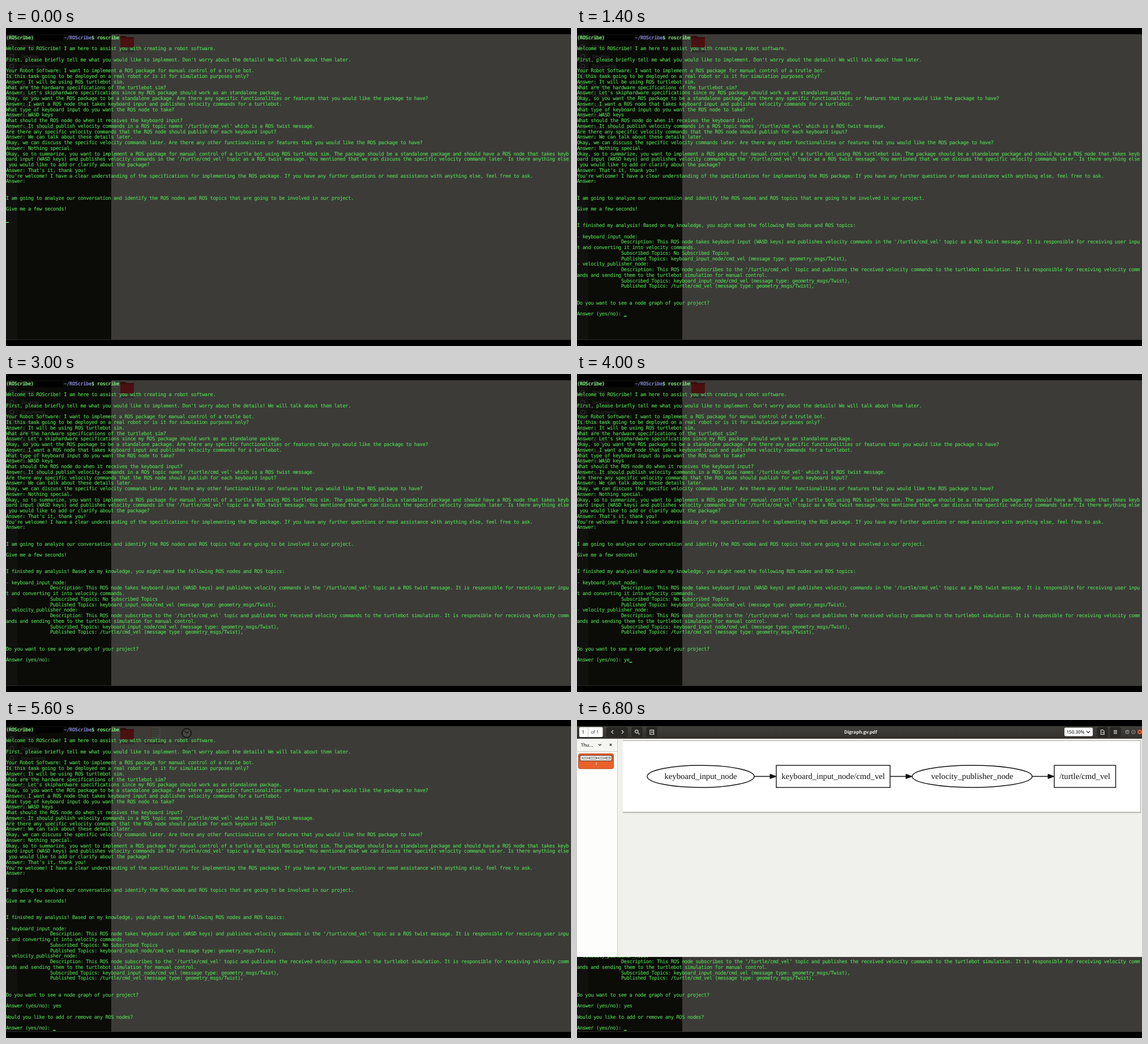
An HTML page that plays this animation: 998x561 px, repeating every 8 s.

```html
<!DOCTYPE html>
<html lang="en">
<head>
<meta charset="utf-8">
<title>ROScribe session</title>
<style>
html, body { margin: 0; width: 100%; height: 100%; overflow: hidden; background: #000; text-rendering: geometricPrecision; }
svg { position: absolute; left: 0; top: 0; font-family: "Open Sans", "Noto Sans", sans-serif; }
/* laid out at ten times the size so the character pitch stays exact */
pre {
  position: absolute; left: 0; top: 12.2px; margin: 0;
  font: 88px/97.43px "DejaVu Sans Mono", monospace; letter-spacing: -4.26px;
  color: #54de54; -webkit-text-stroke: 1px #54de54;
  transform: scale(.1); transform-origin: 0 0;
}
pre b { color: #7be87a; -webkit-text-stroke: 0; }
pre b i { color: #8080d4; font-style: normal; }
#cursor { display: inline-block; width: 48px; height: 16px; vertical-align: -22px; background: #54de54; }
.mono { fill: none; stroke: #dcdcd6; stroke-width: 1.2; }
</style>
</head>
<body>
<svg width="998" height="561">
  <rect y="11" width="998" height="539" fill="#3c3b38"/>
  <rect y="11" width="186" height="539" fill="#0b0b08"/>
  <rect y="11" width="20" height="539" fill="#11110f"/>
  <path d="M0 549.8H998" stroke="#484742" stroke-width=".6"/>
  <g id="places" font-size="8" fill="#3a3937"></g>
  <g id="folder">
    <path d="M202 14h9l2 2h13v18h-24z" fill="#380d0c"/>
    <path d="M202 18h24v16h-24z" fill="#4a1110"/>
    <path d="M203 41h24" stroke="#2b2a28" stroke-width="3" stroke-dasharray="5 1"/>
  </g>
  <g id="files" fill="#292826">
    <rect x="254" y="12" width="20" height="23" fill="#42403c"/>
    <path d="M258 16h12M258 20h12M258 24h12M258 28h9" stroke="#2c2a28"/>
    <path d="M256 13v21" stroke="#4a2925" stroke-width="2"/>
    <path d="M246 41h36" stroke="#2c2b28" stroke-width="3" stroke-dasharray="6 1"/>
    <circle cx="319" cy="23" r="8" fill="#474541" stroke="#151513" stroke-width="1.8"/>
    <path d="M315 19l4 4 4-2" fill="none" stroke="#151513" stroke-width="1.4"/>
    <text x="319" y="43" font-size="8" text-anchor="middle">Digraph.gv.</text>
    <text x="315" y="51" font-size="8" text-anchor="middle">pdf</text>
  </g>
  <rect x="49" y="13" width="52" height="10"/>
</svg>

<pre><b>(ROScribe)           <i>~/ROScribe</i>$ roscribe</b>
<span id="log"></span><span id="cursor"></span></pre>

<svg id="viewer" width="998" height="561">
  <defs>
    <linearGradient id="bar" x2="0" y2="1"><stop stop-color="#42403b"/><stop offset="1" stop-color="#33312d"/></linearGradient>
  </defs>
  <rect y="11" width="998" height="407" fill="#f0f0ec"/>
  <path d="M81 36h915v127.5H81z" fill="#aaa9a4"/>
  <path d="M81 37h914v125H81z" fill="#fff"/>
  <path d="M82 164.2h914" stroke="#d6d6d1"/>
  <g fill="none" stroke="#111" stroke-width="1.4">
    <ellipse cx="218.5" cy="99.5" rx="94.5" ry="19.5"/>
    <rect x="352" y="80" width="201" height="39"/>
    <ellipse cx="698" cy="99.5" rx="106" ry="19.5"/>
    <rect x="843" y="80" width="108.5" height="39"/>
    <path d="M313 99.5h29M553 99.5h29M804 99.5h29"/>
    <path d="M341 95.5l11 4-11 4zM581 95.5l11 4-11 4zM832 95.5l11 4-11 4z" fill="#111" stroke-width="1"/>
  </g>
  <g font-family="'Liberation Serif', serif" font-size="14.7" fill="#111" text-anchor="middle">
    <text x="218.5" y="104">keyboard_input_node</text>
    <text x="452.5" y="104">keyboard_input_node/cmd_vel</text>
    <text x="698" y="104">velocity_publisher_node</text>
    <text x="897" y="104">/turtle/cmd_vel</text>
  </g>

  <rect y="32" width="71" height="386" fill="#fdfdfc"/>
  <rect y="32" width="71" height="23" fill="#f5f5f2"/>
  <path d="M71.5 32v386M0 55.5h71" stroke="#cfcec8"/>
  <text x="7" y="47" font-size="8" font-weight="600" fill="#333">Thu…</text>
  <path d="M38 42.5l2.5 2.5 2.5-2.5M57.7 42l3.6 3.6m0-3.6l-3.6 3.6" fill="none" stroke="#333" stroke-width="1.2"/>
  <rect x="2.5" y="59.5" width="62" height="26.5" rx="3" fill="#e9622c" stroke="#b9481b"/>
  <rect x="5.5" y="62.5" width="56" height="9.5" fill="#fff" stroke="#4a2a1c"/>
  <g fill="none" stroke="#222" stroke-width=".8">
    <ellipse cx="14" cy="67.2" rx="5.7" ry="1.6"/><rect x="22" y="65.6" width="12.2" height="3.2"/>
    <ellipse cx="43" cy="67.2" rx="6.4" ry="1.6"/><rect x="51.5" y="65.6" width="7" height="3.2"/>
    <path d="M19.7 67.2h2.3M34.2 67.2h2.4M49.4 67.2h2.1"/>
  </g>
  <text x="34" y="80" font-size="7" font-style="italic" fill="#fff" text-anchor="middle">1</text>

  <rect y="11" width="998" height="21.5" fill="url(#bar)"/>
  <path d="M0 32.3h998" stroke="#1d1c19"/>
  <rect x="4" y="12.5" width="41.5" height="17.5" rx="2" fill="#fff"/>
  <path d="M19.5 12.5v17.5" stroke="#c5c5c0"/>
  <g font-size="8" font-weight="600" fill="#333">
    <text x="8.5" y="24">1</text>
    <text x="24.5" y="24" font-weight="400">of 1</text>
  </g>
  <g fill="#292824" stroke="#22211e">
    <rect x="53" y="13" width="36" height="16.5" rx="2"/>
    <rect x="97" y="13" width="18" height="16.5" rx="2"/>
    <rect x="123" y="13" width="18" height="16.5" rx="2"/>
    <rect x="919" y="13" width="18" height="16.5" rx="2"/>
    <rect x="942" y="13" width="18" height="16.5" rx="2"/>
  </g>
  <g class="mono">
    <path d="M64 18l-3 3 3 3M79 18l3 3-3 3M107.5 22.5l3 3"/>
    <circle cx="105.3" cy="20.3" r="2.7"/>
    <path d="M129 17.5h6.5v8H129zM130.5 20h4M130.5 22.5h4"/>
    <path d="M925.5 17.5h3.5l2 2v6h-5.5zM927.5 22.5h4M948 18.7h6M948 21.2h6M948 23.7h6"/>
  </g>
  <text x="501" y="24" font-size="8" font-weight="700" fill="#eeede8" text-anchor="middle">Digraph.gv.pdf</text>
  <rect x="861" y="13.5" width="50" height="15" rx="2" fill="#fff"/>
  <text x="864.5" y="24" font-size="8" font-weight="600" fill="#333">150.30%</text>
  <path d="M900 19.5l3 3 3-3" fill="none" stroke="#333" stroke-width="1.3"/>
  <g fill="#74726b" stroke="#22211e" stroke-width=".8">
    <circle cx="972" cy="21" r="4.6"/><circle cx="983" cy="21" r="4.6"/>
    <circle cx="994" cy="21" r="4.6" fill="#ea5b2b"/>
  </g>
  <path d="M970 22h4M981.3 19.3h3.4v3.4h-3.4zM992.3 19.3l3.4 3.4m0-3.4l-3.4 3.4" fill="none" stroke="#2b2a26"/>
</svg>

<script>
const intro = `
Welcome to ROScribe! I am here to assist you with creating a robot software.

First, please briefly tell me what you would like to implement. Don't worry about the details! We will talk about them later.

Your Robot Software: I want to implement a ROS package for manual control of a trutle bot.
Is this task going to be deployed on a real robot or is it for simulation purposes only?
Answer: It will be using ROS turtlebot sim.
What are the hardware specifications of the turtlebot sim?
Answer: Let's skiphardware specifications since my ROS package should work as an standalone package.
Okay, so you want the ROS package to be a standalone package. Are there any specific functionalities or features that you would like the package to have?
Answer: I want a ROS node that takes keyboard input and publishes velocity commands for a turtlebot.
What type of keyboard input do you want the ROS node to take?
Answer: WASD keys
What should the ROS node do when it receives the keyboard input?
Answer: It should publish velocity commands in a ROS topic names '/turtle/cmd_vel' which is a ROS twist message.
Are there any specific velocity commands that the ROS node should publish for each keyboard input?
Answer: We can talk about these details later.
Okay, we can discuss the specific velocity commands later. Are there any other functionalities or features that you would like the ROS package to have?
Answer: Nothing special.
Okay, so to summarize, you want to implement a ROS package for manual control of a turtle bot using ROS turtlebot sim. The package should be a standalone package and should have a ROS node that takes keyb
oard input (WASD keys) and publishes velocity commands in the '/turtle/cmd_vel' topic as a ROS twist message. You mentioned that we can discuss the specific velocity commands later. Is there anything else
 you would like to add or clarify about the package?
Answer: That's it, thank you!
You're welcome! I have a clear understanding of the specifications for implementing the ROS package. If you have any further questions or need assistance with anything else, feel free to ask.
Answer:


I am going to analyze our conversation and identify the ROS nodes and ROS topics that are going to be involved in our project.

Give me a few seconds!

`;
const tab = ' '.repeat(16);
const analysis = `
I finished my analysis! Based on my knowledge, you might need the following ROS nodes and ROS topics:

- keyboard_input_node:
${tab}Description: This ROS node takes keyboard input (WASD keys) and publishes velocity commands in the '/turtle/cmd_vel' topic as a ROS twist message. It is responsible for receiving user inpu
t and converting it into velocity commands.
${tab}Subscribed Topics: No Subscribed Topics
${tab}Published Topics: keyboard_input_node/cmd_vel (message type: geometry_msgs/Twist),
- velocity_publisher_node:
${tab}Description: This ROS node subscribes to the '/turtle/cmd_vel' topic and publishes the received velocity commands to the turtlebot simulation. It is responsible for receiving velocity comm
ands and sending them to the turtlebot simulation for manual control.
${tab}Subscribed Topics: keyboard_input_node/cmd_vel (message type: geometry_msgs/Twist),
${tab}Published Topics: /turtle/cmd_vel (message type: geometry_msgs/Twist),


Do you want to see a node graph of your project?

Answer (yes/no): `;
const question = `
Would you like to add or remove any ROS nodes?

Answer (yes/no): `;

// each entry is printed at its time in ms
const output = [[0, intro], [1400, analysis], [4000, 'ye'], [4600, 's'], [4800, '\n'], [5200, question]];
const byId = id => document.getElementById(id);
const show = (id, on) => byId(id).style.visibility = on ? 'visible' : 'hidden';

const places = ['Recent', 'Home', 'Desktop', 'Documents', 'Downloads', 'Music', 'Pictures', 'Videos', 'Trash', 'Other Locations'];
byId('places').innerHTML = places.map((name, i) => {
  const y = 15 + i * 17.4 + (i == 9 ? 4 : 0);
  return `<text x="27" y="${y + 3}">${name}</text>
    <rect x="7" y="${y - 3}" width="6.5" height="6.5" rx="1.5" fill="none" stroke="#3a3937"/>`;
}).join('');

let last;
function draw(now) {
  const t = now % 8000;
  const text = output.filter(([at]) => t >= at).map(([, s]) => s).join('');
  if (text !== last) byId('log').textContent = last = text;
  show('cursor', t >= 4000 || (t + 200) % 1200 < 600);
  show('files', t >= 5200);
  show('viewer', t >= 5800);
  requestAnimationFrame(draw);
}
draw(0);
</script>
</body>
</html>
```
